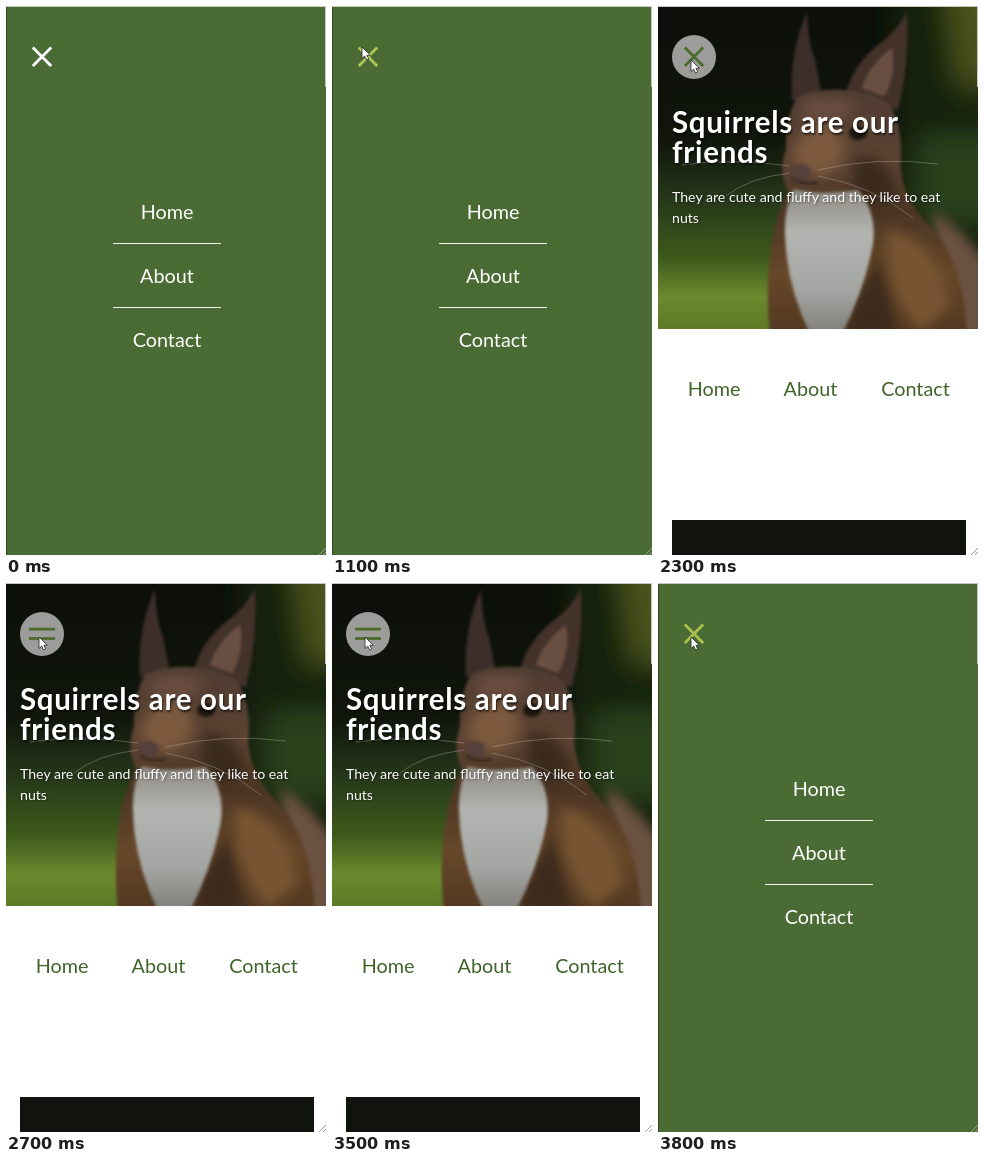
Recreate the animation shown at these times as an HTML page. Size 320 px wide and 549 px high, loop 3900 ms.

```html
<!DOCTYPE html>
<html lang="en">
<head>
<meta charset="utf-8">
<title>Menu toggle</title>
<style>
  html, body { margin: 0; width: 100%; height: 100%; overflow: hidden; background: #fff; }
  svg { display: block; width: 100vw; height: 100vh; }
  text { font-family: Lato, Inter, sans-serif; }
  .nav { font-size: 19.8px; text-anchor: middle; }
  .title { font-size: 29.5px; font-weight: 700; letter-spacing: .7px; fill: #fff; text-shadow: 1px 2px 2px #0009; }
  .intro { font-size: 14.15px; fill: #fff; text-shadow: 1px 1px 2px #0006; }
</style>
</head>
<body>
<svg viewBox="0 0 320 549" preserveAspectRatio="none">
  <defs>
    <linearGradient id="meadow" x1="0" y1="0" x2="0" y2="1">
      <stop offset="0" stop-color="#0c0f0a"/>
      <stop offset=".42" stop-color="#10160c"/>
      <stop offset=".6" stop-color="#26381a"/>
      <stop offset=".78" stop-color="#3d5a1b"/>
      <stop offset=".9" stop-color="#6b8a2e"/>
      <stop offset="1" stop-color="#5d7a26"/>
    </linearGradient>
    <linearGradient id="fur" x1="0" y1="0" x2="0" y2="1">
      <stop offset="0" stop-color="#4f3c33"/>
      <stop offset=".3" stop-color="#5c4333"/>
      <stop offset=".5" stop-color="#4c3524"/>
      <stop offset=".75" stop-color="#664729"/>
      <stop offset="1" stop-color="#513720"/>
    </linearGradient>
    <linearGradient id="bib" x1="0" y1="0" x2="0" y2="1">
      <stop offset="0" stop-color="#8c887f"/>
      <stop offset=".3" stop-color="#b2b4b0"/>
      <stop offset=".7" stop-color="#a4a6a3"/>
      <stop offset="1" stop-color="#7f7d77"/>
    </linearGradient>
    <filter id="soft" x="-20%" y="-20%" width="140%" height="140%"><feGaussianBlur stdDeviation="1.5"/></filter>
    <filter id="blend" x="-40%" y="-40%" width="180%" height="180%"><feGaussianBlur stdDeviation="6"/></filter>
    <filter id="haze" x="-60%" y="-60%" width="220%" height="220%"><feGaussianBlur stdDeviation="14"/></filter>
    <clipPath id="hero"><path d="M0 0H320V323H0Z"/></clipPath>
  </defs>

  <g id="page">
    <path d="M0 0H320V549H0Z" fill="#fff"/>
    <g clip-path="url(#hero)">
      <path d="M0 0H320V323H0Z" fill="url(#meadow)"/>
      <g filter="url(#haze)">
        <path d="M235 -30H360V360H235Z" fill="#17230f"/>
        <path d="M285 -30H360V80H300Z" fill="#48521d"/>
        <path d="M262 130H350V215H262Z" fill="#2b421c"/>
      </g>
      <path d="M275 205Q310 225 340 275V340H280Z" fill="#6b5140" filter="url(#blend)"/>
      <g filter="url(#soft)">
        <path d="M134 94Q131 48 149 6Q150 38 157 54Q161 74 164 92Z" fill="#3c2f29"/>
        <path d="M187 92Q192 64 216 42Q240 25 249 5Q252 55 240 104Z" fill="#42322b"/>
        <path d="M204 82Q212 58 234 42Q238 70 226 90Z" fill="#694f42"/>
        <path d="M139 92Q160 82 186 84Q214 86 231 98Q246 122 242 160Q246 196 272 220Q306 255 309 330H112Q107 285 113 240Q118 208 130 186Q120 166 128 144Q127 112 139 92Z" fill="url(#fur)"/>
      </g>
      <g filter="url(#blend)">
        <path d="M144 96Q172 88 200 98L186 112H146Z" fill="#6a4d41"/>
        <path d="M152 118Q178 116 187 138Q185 166 160 170Q140 166 134 146Z" fill="#7d5a3e"/>
        <path d="M196 150Q230 145 240 190Q220 215 195 184Z" fill="#3a291d"/>
        <path d="M228 225Q276 228 292 300L262 325Q230 290 228 225Z" fill="#785532"/>
        <path d="M196 295L222 250L240 330H186Z" fill="#3d2a1b"/>
      </g>
      <path d="M136 183Q160 190 200 184Q219 206 215 238Q207 282 184 328H152Q128 278 127 228Q126 202 136 183Z" fill="url(#bib)" filter="url(#soft)"/>
      <ellipse cx="200" cy="127" rx="9" ry="7" fill="#1a1411" filter="url(#soft)"/>
      <ellipse cx="143" cy="166" rx="10" ry="8" fill="#55403a" filter="url(#soft)"/>
      <path d="M134 172Q146 181 160 176" fill="none" stroke="#2b201b" stroke-width="2" filter="url(#soft)"/>
      <path d="M132 160Q75 152 24 159M132 167Q90 172 68 190M160 164Q220 150 280 158M160 170Q215 180 255 212" fill="none" stroke="#c9c0b4" stroke-width=".7" opacity=".5"/>
    </g>
    <text class="title" x="14" y="126.5">Squirrels are our</text>
    <text class="title" x="14" y="156.5">friends</text>
    <text class="intro" x="14" y="195.5">They are cute and fluffy and they like to eat</text>
    <text class="intro" x="14" y="216.5">nuts</text>
    <g class="nav" fill="#3f642a">
      <text x="56" y="390">Home</text>
      <text x="152.5" y="390">About</text>
      <text x="257.5" y="390">Contact</text>
    </g>
    <path d="M14 514H308V549H14Z" fill="#11140e"/>
    <circle cx="36" cy="51" r="22" fill="#9c9c9a"/>
  </g>

  <g id="menu">
    <path d="M0 0H320V549H0Z" fill="#4a6c34"/>
    <path d="M.5 0V549" stroke="#2c4a22"/>
    <g class="nav" fill="#fff">
      <text x="161" y="213">Home</text>
      <text x="161" y="277">About</text>
      <text x="161" y="340.5">Contact</text>
    </g>
    <path d="M107 237.5H215M107 301.5H215" stroke="#f2f5ee"/>
  </g>

  <path d="M0 .5H320M319.5 0V81" stroke="#c3c8bd"/>
  <path d="M313 549L320 542M317 549L320 546" stroke="#9aa094"/>

  <g id="bars" stroke-width="2.8">
    <path d="M-13 0H13"/>
    <path d="M-13 0H13"/>
  </g>
  <path id="cursor" d="M0 0V11.5L2.7 9.1L4.6 13L6.7 12L4.9 8.3H8.3Z" fill="#fff" stroke="#22271f" stroke-width=".8"/>
</svg>

<script>
const LOOP = 3900, STEP = 100;
const GREEN = [75, 108, 45], WHITE = [255, 255, 255], LIME = [170, 193, 78];
const $ = id => document.getElementById(id);
const [page, menu, bars, cursor] = ['page', 'menu', 'bars', 'cursor'].map($);

// [time, x, y] of the pointer tip
const PATH = [[700, 72, -16], [1100, 30, 41], [1600, 33, 54]];

const ease = p => p * p * (3 - 2 * p);
const ramp = (t, a, b) => ease(Math.min(1, Math.max(0, (t - a) / (b - a))));
const mix = (a, b, p) => a + (b - a) * p;
const show = (el, on) => { el.style.display = on ? '' : 'none'; };

function pointer(t) {
  let [, x, y] = PATH[0];
  for (let i = 1; i < PATH.length; i++) {
    const p = ramp(t, PATH[i - 1][0], PATH[i][0]);
    x = mix(x, PATH[i][1], p);
    y = mix(y, PATH[i][2], p);
  }
  return `translate(${x} ${y})`;
}

function draw(t) {
  const open = t < 2300 || t >= 3600;
  show(page, !open);
  show(menu, open);

  // 1 = cross, 0 = two bars
  const cross = t < 3500 ? 1 - ramp(t, 2300, 2700) : ramp(t, 3500, 3800);
  [-1, 1].forEach((side, i) => {
    const y = 50.8 + side * 4.7 * (1 - cross);
    bars.children[i].setAttribute('transform', `translate(36 ${y}) rotate(${-side * 45 * cross})`);
  });
  const hover = ramp(t, 850, 1150);
  const color = open ? WHITE.map((c, i) => Math.round(mix(c, LIME[i], hover))) : GREEN;
  bars.setAttribute('stroke', `rgb(${color})`);

  show(cursor, t >= PATH[0][0]);
  cursor.setAttribute('transform', pointer(t));
}

const start = performance.now();
function tick() {
  const t = (performance.now() - start) % LOOP;
  draw(Math.floor(t / STEP) * STEP);
  requestAnimationFrame(tick);
}
tick();
</script>
</body>
</html>
```
